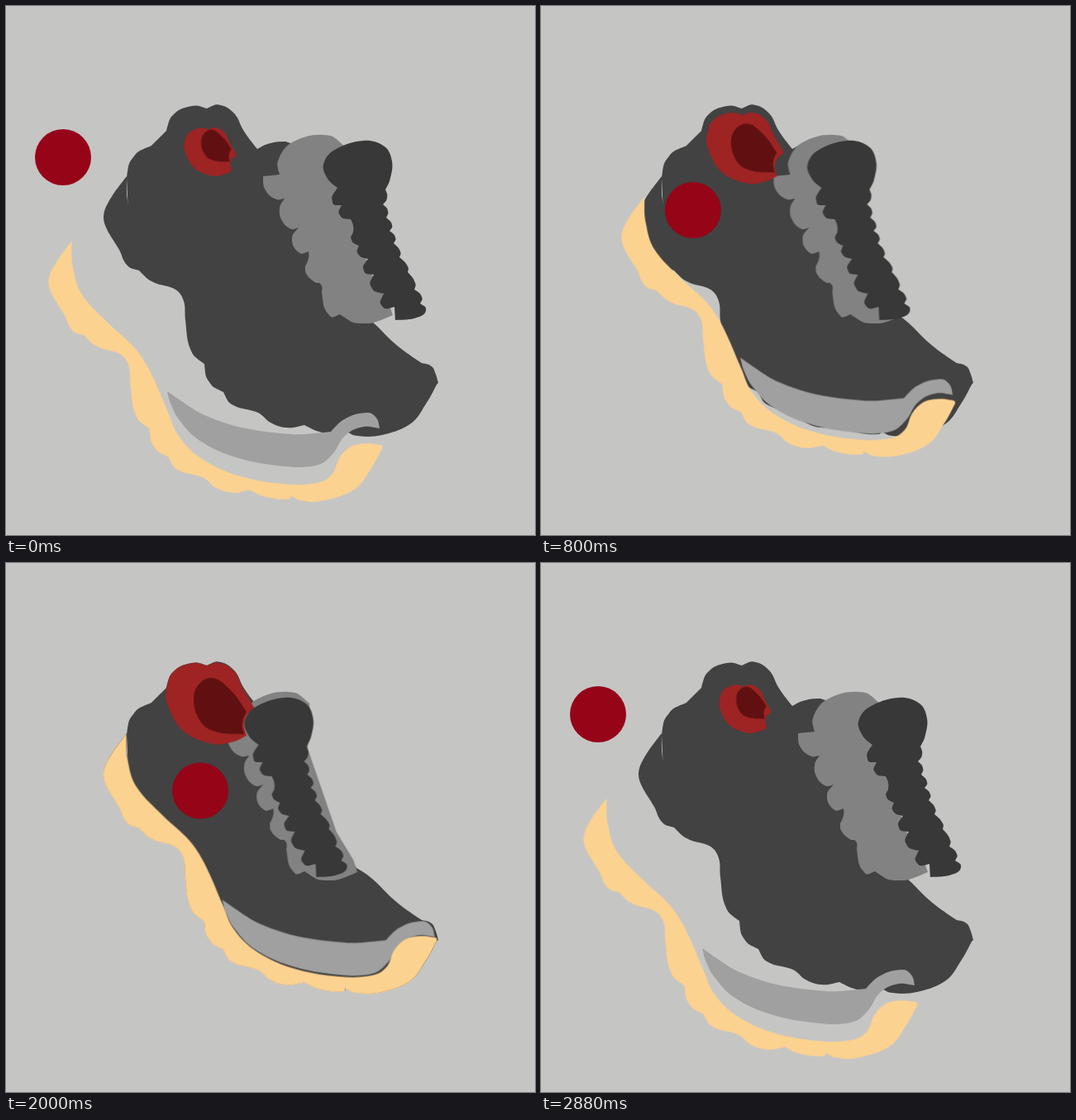
Recreate the animation shown at these times as an HTML page. Size 640 by 640 pixels, loop 2920 ms.

```html
<!DOCTYPE html>
<html lang="en">
<head>
<meta charset="utf-8">
<title>Shoe assembly</title>
<style>
  html, body { margin: 0; width: 100%; height: 100%; overflow: hidden; background: #c5c5c4; }
  svg { display: block; width: 100%; height: 100%; }

  .part {
    --shut: translate(0px, 0px);
    --open: translate(0px, 0px);
    --ease: cubic-bezier(.05, 0, .05, 1);
    animation: assemble 2920ms infinite;
  }
  .sole   { --open: translate(-66.5px, 78.5px); }
  .strip  { --open: translate(-67px, 59px); }
  .badge  { --open: translate(-167px, -93px); }
  .tongue { --shut: translate(-43px, 0px); }
  .laces  { --shut: translate(-96px, 0px); animation-name: assemble-late; }
  .collar { --shut: scale(1); --open: scale(.59); transform-origin: 247.7px 186px; }
  .lining { --shut: scale(1); --open: scale(.57); transform-origin: 248px 164px; }

  /* hold open, close, hold shut, open again */
  @keyframes assemble {
    0% { transform: var(--open); }
    8.36% { transform: var(--open); animation-timing-function: var(--ease); }
    55.62% { transform: var(--shut); }
    68.15% { transform: var(--shut); animation-timing-function: var(--ease); }
    98.63%, 100% { transform: var(--open); }
  }
  @keyframes assemble-late {
    0% { transform: var(--open); }
    13.25% { transform: var(--open); animation-timing-function: var(--ease); }
    51.3% { transform: var(--shut); }
    68.15% { transform: var(--shut); animation-timing-function: var(--ease); }
    98.63%, 100% { transform: var(--open); }
  }
</style>
</head>
<body>
<svg viewBox="0 0 640 640"></svg>
<script>
// Outlines as "x,y" points joined smoothly; "!" marks a sharp corner.
const body = `146,208! 154,183 176,169! 194,151! 204,130 225,121 243,124! 260,120 277,131 287,150
  304,173! 320,166 338,164! 362,172! 363,237! 398,330! 424,369! 443,382 470,408 503,432!
  515,436 519,443 523,456! 470,505! 345,497! 290,480! 250,430! 222,345! 150,290!`;

const sole = `146,206! 123,239 118,255 122,270 137,295 146,313 161,320! 178,334 205,343 215,357
  217,380 223,415 240,433! 246,455 263,467! 275,483 305,492 320,504 338,510 361,507!
  383,516 409,518 411,514! 425,520 455,519 490,505 507,483 522,456! 521,453! 500,451
  483,455 470,468 461,488 445,498 405,500 345,489 300,467 275,441 263,414 240,362
  222,335 190,305 158,270 148,240`;

const strip = `262,407! 325,443 400,458 460,456! 480,439 504,433 514,438 519,452! 495,451
  476,462 463,482 445,496 405,498 345,487 300,466 276,441 267,424`;

const collar = `194,150! 204,130 225,121 243,124! 260,121 277,132 286,150 301,176! 289,190
  291,209! 272,217 250,219 214,203 195,170`;

const lining = `227,165 233,147 250,139 270,152 291,180! 286,193 288,207! 250,203 234,190`;

const tongue = `346,165 385,156 410,170! 408,225! 443,326! 463,359! 468,374! 430,384 404,373!
  391,374 382,346! 381,337 375,335! 364,325 362,315! 366,305 366,297! 354,298 346,283
  354,268! 343,269 333,258 331,245 337,233! 325,233 314,223 311,206! 331,204! 330,185`;

const laces = `384,192 396,175 432,163 458,170 467,188 465,208 459,222! 461,232 456,240!
  462,248 460,256! 467,265 464,272! 471,280 469,287! 477,297 476,304! 486,315 486,322!
  495,335 494,343! 503,352 501,360! 508,368 500,376 471,380! 470,364! 455,363 457,348!
  442,340 445,325! 433,320 438,306! 426,300 427,290! 418,283 420,274! 420,266 417,258!
  404,253 406,241! 395,237 401,220! 388,207`;

function outline(text) {
  const pts = text.trim().split(/\s+/).map(t => {
    const [x, y] = t.split(',').map(parseFloat);
    return { x, y, sharp: t.endsWith('!') };
  });
  const at = i => pts[(i + pts.length) % pts.length];

  // Handle of point i, along the line between its neighbours.
  const handle = (i, length) => {
    const p = at(i), a = at(i - 1), b = at(i + 1);
    const k = length / Math.hypot(b.x - a.x, b.y - a.y);
    return { x: p.x + (b.x - a.x) * k, y: p.y + (b.y - a.y) * k };
  };

  let d = `M${pts[0].x} ${pts[0].y}`;
  pts.forEach((p, i) => {
    const q = at(i + 1);
    const reach = Math.hypot(q.x - p.x, q.y - p.y) * 0.36;
    let c1 = p.sharp ? null : handle(i, reach);
    let c2 = q.sharp ? null : handle(i + 1, -reach);
    c1 = c1 || c2 || p;
    c2 = c2 || c1;
    if (p.sharp && q.sharp) c2 = q;
    d += `C${c1.x} ${c1.y} ${c2.x} ${c2.y} ${q.x} ${q.y}`;
  });
  return d + 'Z';
}

const svg = document.querySelector('svg');

function add(tag, attrs) {
  const el = document.createElementNS(svg.namespaceURI, tag);
  for (const key in attrs) el.setAttribute(key, attrs[key]);
  svg.append(el);
}

const shape = (points, fill, part) =>
  add('path', { d: outline(points), fill, class: part ? 'part ' + part : 'still' });

shape(body, '#424242');
shape(sole, '#424242');
shape(tongue, '#828282', 'tongue');
shape(collar, '#9e2424', 'collar');
shape(lining, '#601010', 'lining');
shape(laces, '#383838', 'laces');
shape(strip, '#a0a0a0', 'strip');
shape(sole, '#fcd290', 'sole');
add('circle', { cx: 236, cy: 276, r: 34, fill: '#960418', class: 'part badge' });
</script>
</body>
</html>
```
